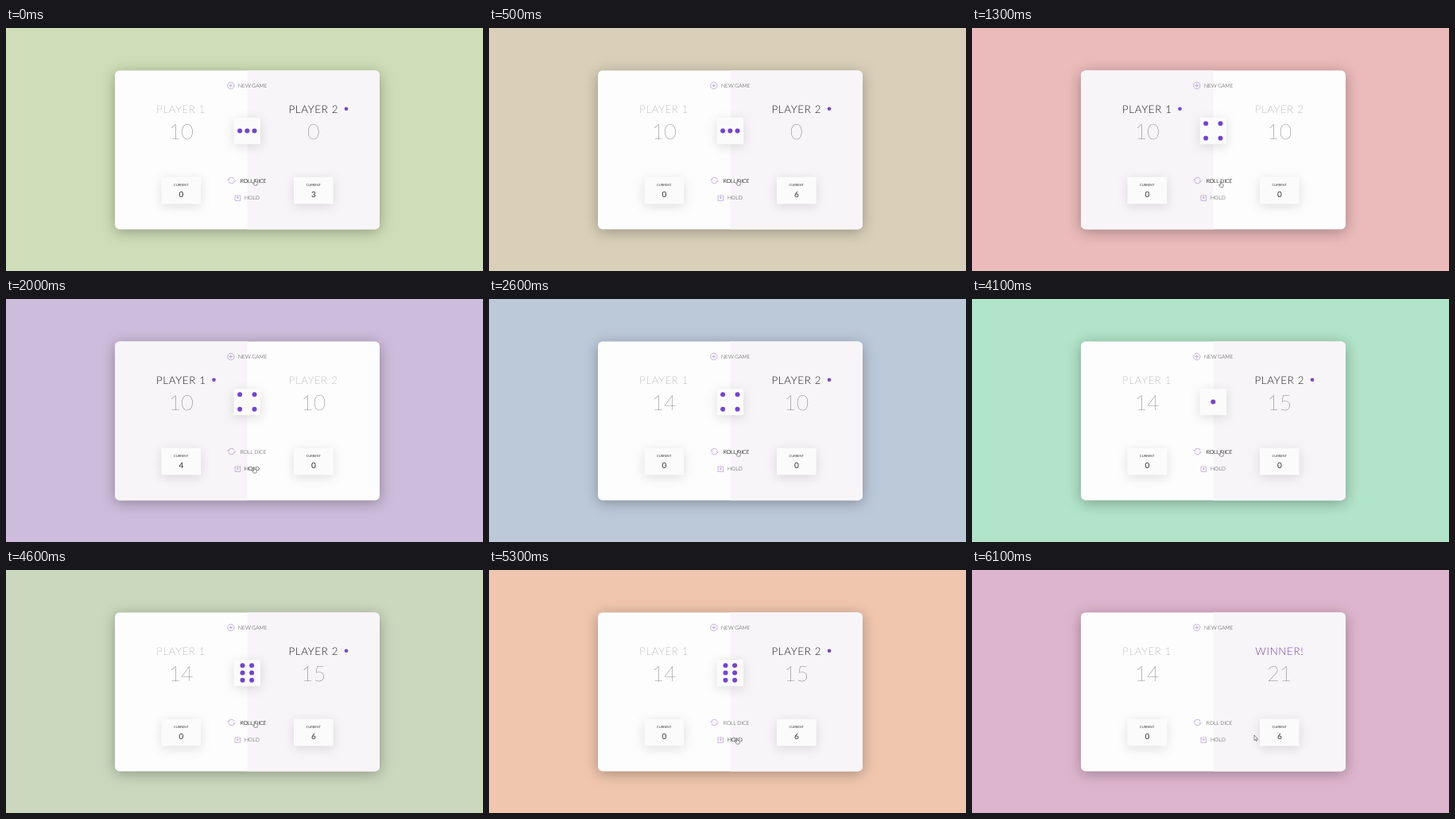
These frames come from a looping animation (600x306 px, 6.2 s). An HTML page:

```html
<!DOCTYPE html>
<html lang="en">
<head>
<meta charset="utf-8">
<title>Dice game</title>
<style>
  html, body { margin: 0; width: 100%; height: 100%; overflow: hidden; }
  svg { display: block; width: 600px; height: 306px; font-family: Lato, sans-serif; fill: #333; text-rendering: geometricPrecision; }
  .card { fill: #fefdfe; filter: drop-shadow(0 3.3px 8.3px rgba(0, 0, 0, .3)); }
  .box { fill: #fcfbfc; filter: drop-shadow(0 3.3px 7px rgba(0, 0, 0, .12)); }
  .mid { text-anchor: middle; }
  .name { font-size: 13.33px; letter-spacing: .667px; }
  .score { font-size: 26.67px; font-weight: 100; }
  .label { font-size: 4px; }
  .current { font-size: 10px; }
  .button { font-size: 6.67px; font-weight: 300; }
  .hover { fill: #000; stroke: #000; stroke-width: .1; }
  .icon { fill: none; stroke: #8a6cba; stroke-width: .5; }
  .dot { fill: #7345d0; }
  .pointer { fill: #fff; stroke: #444; stroke-width: .6; stroke-linejoin: round; }
</style>
</head>
<body>
<svg id="stage" viewBox="0 0 600 306">
  <clipPath id="clip"><rect x="137" y="53.5" width="333" height="200" rx="6"/></clipPath>
  <rect class="card" x="137" y="53.5" width="333" height="200" rx="6"/>
  <rect id="panel" y="53" width="167" height="201" fill="#f7f5f7" clip-path="url(#clip)"/>
  <g id="players"></g>
  <circle id="active" class="dot" cy="101.7" r="2.3"/>
  <g id="die">
    <rect class="box" x="286.7" y="113" width="33.3" height="33.3" rx="1.5"/>
    <g id="pips" class="dot"></g>
  </g>
  <g class="icon">
    <circle cx="282.8" cy="72.5" r="4.2"/>
    <path d="M280.4 72.5h4.8M282.8 70.1v4.8"/>
    <path d="M279.8 191a4 4 0 0 1 7.6 0M287.4 193a4 4 0 0 1-7.6 0M278.5 192.3l1.2-1.6 1.5 1.2M288.7 191.7l-1.2 1.6-1.5-1.2"/>
    <path d="M290 211h-2v6.3h6.6V211h-2M291.3 209.6v5M289.8 213.1l1.5 1.6 1.5-1.6"/>
  </g>
  <text class="button" x="292" y="75">NEW GAME</text>
  <text id="roll" x="294.7" y="194.5">ROLL DICE</text>
  <text id="hold" x="300" y="216.2">HOLD</text>
  <g id="cursor">
    <path id="arrow" class="pointer" d="M0 0v6.6l1.5-1.4 1.1 2.3 1-.5-1-2.2h2z"/>
    <path id="hand" class="pointer" d="M-.6 0q.7-.8 1.2 0v2.5l2.3.6q.6.2.5 1l-.6 3h-3.4l-2-2.8q.3-.9 1.1-.3l.9.7z"/>
  </g>
</svg>
<script>
const LOOP = 6200, GOAL = 20, HOLD = 0;
const $ = id => document.getElementById(id);

const backdrop = [
  [0, '#cfdeb8'], [1300, '#ebbaba'], [2000, '#cdbcdb'], [3200, '#aad5d6'],
  [4100, '#b1e4c8'], [5300, '#f0c6ae'], [LOOP - 100, '#deb5ce']
];

// each click: its time and the face rolled, or HOLD
const clicks = [
  [300, 3], [600, 4], [1000, HOLD], [1600, 4], [2200, HOLD],
  [2950, 5], [3450, HOLD], [3900, 1], [4600, 6], [5600, HOLD]
];

const start = { time: 0, active: 1, scores: [10, 0], points: 3, die: 3, won: false };

function play(state, [time, face]) {
  const { active, scores, points } = state;
  if (face > 1) return { ...state, time, die: face, points: points + face };
  if (face === 1) return { ...state, time, die: 1, points: 0, active: 1 - active };
  const total = scores.with(active, scores[active] + points);
  if (total[active] >= GOAL) return { ...state, time, scores: total, won: true };
  return { ...state, time, scores: total, points: 0, active: 1 - active };
}

const turns = [start];
for (const click of clicks) turns.push(play(turns.at(-1), click));

function pips(n) {
  const line = [-9.2, 0, 9.2];
  if (n === 3) return line.map(x => [x, 0]);
  if (n === 6) return line.flatMap(y => [[-5.8, y], [5.8, y]]);
  const corners = n > 3 ? [-9.2, 9.2].flatMap(x => [[x, -9.2], [x, 9.2]]) : [];
  return n % 2 ? [...corners, [0, 0]] : corners;
}

function background(t) {
  const i = backdrop.findLastIndex(key => key[0] <= t);
  const [from, a] = backdrop[i], [to, b] = backdrop[i + 1] ?? [LOOP, a];
  return `color-mix(in srgb, ${b} ${100 * (t - from) / (to - from)}%, ${a})`;
}

// the pointer leaves each click for the button that is pressed next
function pointer(t) {
  const target = click => !click ? [355, 208] : click[1] === HOLD ? [312, 212] : [313, 191];
  const next = clicks.findIndex(click => click[0] > t);
  const i = next < 0 ? clicks.length : next;
  const last = clicks[Math.max(i - 1, 0)];
  const k = Math.min(Math.max((t - last[0] - 100) / 300, 0), 1);
  const ease = 1 - (1 - k) ** 2;
  const goal = target(clicks[i]);
  return target(last).map((v, axis) => v + (goal[axis] - v) * ease);
}

$('players').innerHTML = [220.3, 386.8].map((x, i) => `
  <text class="mid name" id="name${i}" x="${x}" y="106.7"></text>
  <text class="mid score" id="score${i}" x="${x}" y="139.7"></text>
  <rect class="box" x="${x - 24.8}" y="187.8" width="49.6" height="33.8" rx="1"/>
  <text class="mid label" x="${x}" y="199">CURRENT</text>
  <text class="mid current" id="current${i}" x="${x}" y="213.4"></text>`).join('');

const show = (id, visible) => $(id).style.display = visible ? '' : 'none';

function draw(t) {
  const { active, scores, points, die, won } = turns.findLast(turn => turn.time <= t);
  $('stage').style.background = background(t);
  $('panel').setAttribute('x', active ? 303.5 : 136.5);
  $('active').setAttribute('cx', active ? 428 : 261.5);
  show('active', !won);
  show('die', !won);
  $('pips').innerHTML = pips(die).map(([x, y]) =>
    `<circle cx="${303.3 + x}" cy="${129.5 + y}" r="3"/>`).join('');

  for (const i of [0, 1]) {
    const name = $('name' + i), winner = won && i === active;
    name.textContent = winner ? 'WINNER!' : `PLAYER ${i + 1}`;
    name.style.fontWeight = i === active ? 300 : 100;
    name.style.fill = winner ? '#7a40b8' : '#222';
    $('score' + i).textContent = scores[i];
    $('current' + i).textContent = i === active ? points : 0;
  }

  const [x, y] = pointer(t);
  const onRoll = y < 198, onHold = x < 319 && y > 209;
  $('roll').setAttribute('class', onRoll ? 'button hover' : 'button');
  $('hold').setAttribute('class', onHold ? 'button hover' : 'button');
  $('cursor').setAttribute('transform', `translate(${x} ${y})`);
  show('hand', onRoll || onHold);
  show('arrow', !onRoll && !onHold);
}

function tick() {
  const t = performance.now() % LOOP;
  draw(Math.floor(t / 100) * 100);
  requestAnimationFrame(tick);
}
tick();
</script>
</body>
</html>
```
